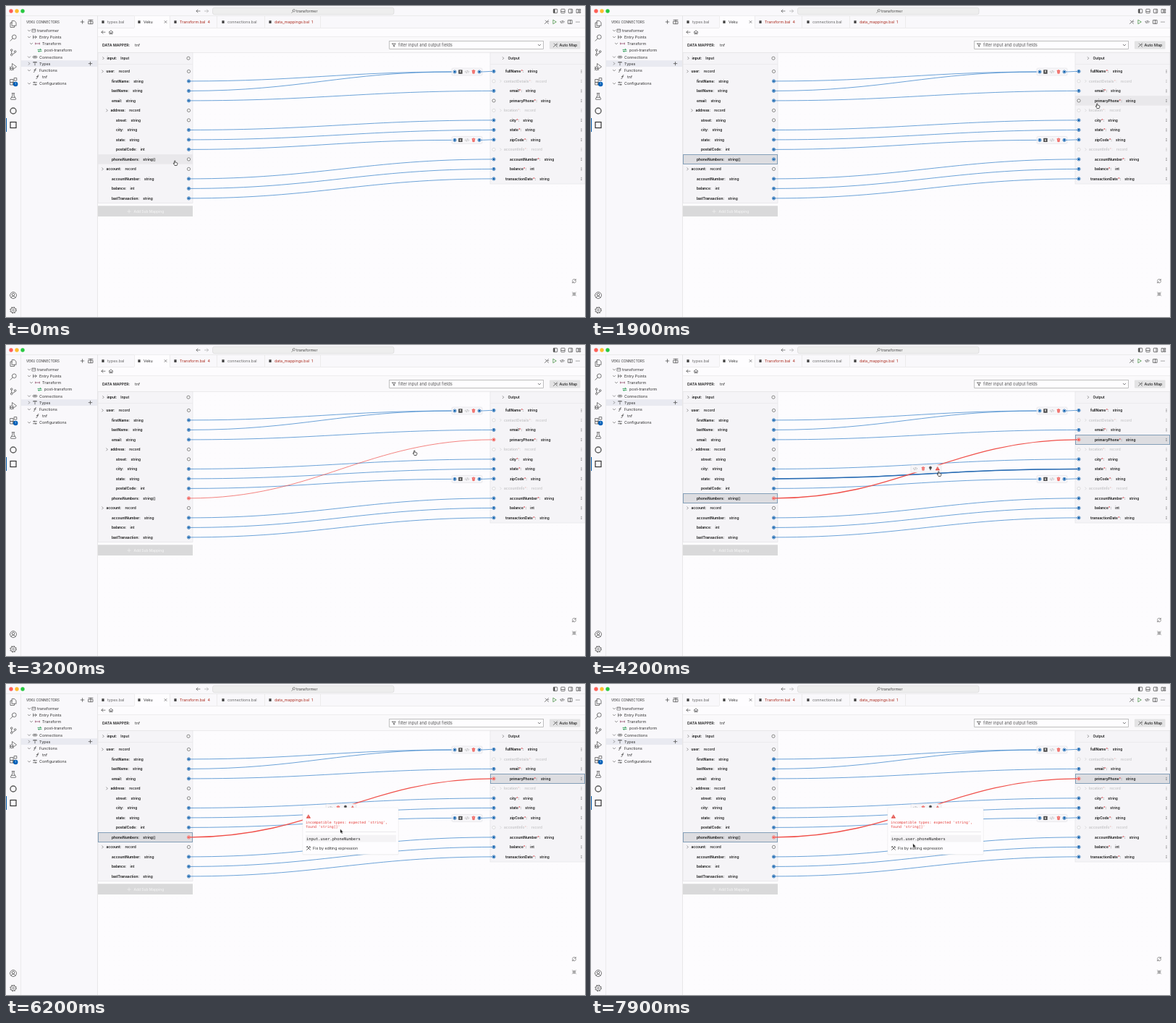
Write an HTML page that moves like this. It is 800 by 430 pixels and loops after 8000 ms.

```html
<!DOCTYPE html>
<html lang="en">
<head>
<meta charset="utf-8">
<title>Data mapper</title>
<style>
html, body { margin: 0; width: 100%; height: 100%; overflow: hidden; background: #fdfcfe }
svg { display: block; width: 100vw; height: 100vh; font-family: Inter, "Liberation Sans", sans-serif }
text { white-space: pre }
.mono { font-family: "DejaVu Sans Mono", monospace }
</style>
</head>
<body>
<svg id="stage" viewBox="0 0 800 430"></svg>
<script>
const LOOP = 8000, PICK = 300, JOIN = 2200, SELECT = 3600, POPUP = 4700;
const BLUE = '#0a5cab', RED = '#f0504a', INK = '#333', DIM = '#c9c9cb', SIDE = '#f9f8fb';
const out = [];
const add = s => out.push(s);
const rect = (x, y, w, h, fill, more = '') =>
  add(`<rect x="${x}" y="${y}" width="${w}" height="${h}" fill="${fill}" ${more}/>`);
const circle = (x, y, r, fill, more = '') =>
  add(`<circle cx="${x}" cy="${y}" r="${r}" fill="${fill}" ${more}/>`);
const text = (x, y, s, size = 5.4, fill = INK, more = '') =>
  add(`<text x="${x}" y="${y + size * .36}" font-size="${size}" fill="${fill}" ${more}>${s}</text>`);
const icon = (x, y, d, color = '#444', w = .7, fill = 'none') =>
  add(`<path transform="translate(${x} ${y})" d="${d}" fill="${fill}" stroke="${color}" stroke-width="${w}" stroke-linejoin="round" stroke-linecap="round"/>`);
// Wraps what is drawn so that it shows only between two times
const during = (from, to, draw) => {
  add(`<g data-from="${from}" data-to="${to}">`);
  draw();
  add('</g>');
};

const shape = {
  down: 'M-1.7-.8L0 .9L1.7-.8',
  right: 'M-.8-1.6L.8 0L-.8 1.6',
  left: 'M2.5 0H-2.5M-.6-2L-2.5 0L-.6 2',
  forward: 'M-2.5 0H2.5M.6-2L2.5 0L.6 2',
  cross: 'M-1.5-1.5L1.5 1.5M1.5-1.5L-1.5 1.5',
  plus: 'M-2.3 0H2.3M0-2.3V2.3',
  code: 'M-1.6-1.2L-2.8 0L-1.6 1.2M1.6-1.2L2.8 0L1.6 1.2M.5-1.7L-.5 1.7',
  trash: 'M-2-1.6H2M-.7-2.3H.7M-1.5-1.4L-1.2 2.2H1.2L1.5-1.4M-.4-.6V1.4M.4-.6V1.4',
  warn: 'M0-2.2L2.5 2H-2.5Z',
  wand: 'M-2.5 2.5L1 -1M-1.7-2L-.3-.6M2.4-2.4L1.5-1.5M.8 .8L2.4 2.4M1.6-.3H2.8',
  fn: 'M1.5-2.4Q.2-2.8 0-.8L-.4 1.5Q-.6 2.7-1.7 2.4M-1.2-.4H1.2',
  find: 'M-2.2 2.4L-.7 .8M-.9-.7a1.7 1.7 0 1 0 3.4 0a1.7 1.7 0 1 0-3.4 0'
};

function port(x, y, color) {
  circle(x, y, 2.1, '#fff', `stroke="${color || '#555'}" stroke-width=".7"`);
  if (color) circle(x, y, 1.3, color);
}

// Window frame, title bar and side bars
function shell() {
  rect(0, 0, 800, 430, '#fdfcfe');
  add('<defs><pattern id="grid" width="6.65" height="6.65" patternUnits="userSpaceOnUse"><circle cx="3" cy="3" r=".4" fill="#f1f0f5"/></pattern></defs>');
  rect(127, 64, 673, 366, 'url(#grid)');
  rect(0, 0, 800, 30, SIDE);
  rect(0, 13, 126, 417, SIDE);
  rect(0, 13.2, 800, .6, '#e3e3e3');
  rect(20, 13.5, .6, 417, '#e3e3e3');
  rect(126, 13.5, .7, 417, '#dedede');
  ['#ff5f57', '#febc2e', '#28c840'].forEach((c, i) => circle(7 + i * 8, 7, 2.7, c));
  icon(265.5, 7, shape.left, '#555');
  icon(277, 7, shape.forward, '#aaa');
  rect(285.5, 2.3, 250.5, 9.4, '#eeeeee', 'rx="2.5" stroke="#d6d6d6" stroke-width=".6"');
  icon(397, 7, shape.find, '#555', .6);
  text(401, 7, 'transformer', 5.3, '#444');
  [759, 769.5, 780].forEach((x, i) => {
    rect(x - 2.7, 4.3, 5.4, 5.4, 'none', 'rx=".7" stroke="#444" stroke-width=".7"');
    rect(...[[x - 2.5, 4.5, 2, 5], [x - 2.5, 7.3, 5, .7], [x + .6, 4.5, .7, 5]][i], '#444');
  });
  icon(791, 7, 'M-2.5-2.5H-.2V2.5H-2.5ZM1.2-2.5H2.8V-.6H1.2ZM1.2.8H2.8V2.5H1.2Z');

  const bar = [
    [25, 'M-1.5-4.5H1.7L4 -2.2V2.3H-1.5ZM-1.5-2H-4V4.5H1.5V2.3'],
    [44, 'M-4 4.2L-.8 .8M-1.6-1.2a2.9 2.9 0 1 0 5.8 0a2.9 2.9 0 1 0-5.8 0'],
    [64, 'M-3.6-3a1.3 1.3 0 1 0 2.6 0a1.3 1.3 0 1 0-2.6 0M-2.3-1.7V2.2M-3.6 3.5a1.3 1.3 0 1 0 2.6 0a1.3 1.3 0 1 0-2.6 0M1.4-1a1.3 1.3 0 1 0 2.6 0a1.3 1.3 0 1 0-2.6 0M2.7.3Q2.5 2-1 2.4'],
    [84, 'M-1.5-1V-4.5L4.5 0L.5 3M-4 1.7a1.8 1.8 0 0 1 3.6 0V3a1.8 1.8 0 0 1-3.6 0ZM-4.8.2L-4 1M.3.2L-.4 1M-4.9 2.4H.4M-4.8 4.6L-4 3.8M.3 4.6L-.4 3.8'],
    [104, 'M-4-2.5H0V1.5H-4ZM-4 1.5H0V5H-4ZM0 1.5H4V5H0ZM1.5-4.5H4.8V-1H1.5Z'],
    [125, 'M-1.8-4.2H1.8M-1.1-4.2V-1L-3.6 3.2Q-4 4.2-3 4.3H3Q4 4.2 3.6 3.2L1.1-1V-4.2M-2.4 1.3H2.4'],
    [400, 'M-4.5 0a4.5 4.5 0 1 0 9 0a4.5 4.5 0 1 0-9 0M-1.8-1a1.8 1.8 0 1 0 3.6 0a1.8 1.8 0 1 0-3.6 0M-2.9 3.2Q-2 1 0 1T2.9 3.2']
  ];
  bar.forEach(([y, d]) => icon(10, y, d, '#5a5a5a', .8));
  circle(10, 145, 4, 'none', 'stroke="#5a5a5a" stroke-width="1.4"');
  rect(6, 160.5, 8, 8, 'none', 'stroke="#333" stroke-width="1.2"');
  rect(0, 155, 1, 19, BLUE);
  circle(13.2, 108, 3.2, '#005fb8');
  text(13.2, 108, '1', 4, '#fff', 'text-anchor="middle"');
  circle(10, 420.5, 3.5, 'none', 'stroke="#5a5a5a" stroke-width=".8"');
  circle(10, 420.5, 1.3, 'none', 'stroke="#5a5a5a" stroke-width=".7"');
  circle(10, 420.5, 4.3, 'none', 'stroke="#5a5a5a" stroke-width="1" stroke-dasharray="1.7 1.677"');

  text(28, 22, 'VEKU CONNECTORS', 4.6);
  icon(105.5, 22, shape.plus);
  icon(117, 22, 'M-3-2.7H3M-3-.8H3V2.7H-3ZM0-2.7V2.7');
  rect(20.6, 75.2, 105.4, 8.8, '#e9eaf1');
  const tree = [
    [34, 32, 43, 'transformer'], [43, 32, 46, 'Entry Points'], [52, 35, 50, 'Transform'],
    [61.4, 0, 53, 'post-transform'], [70.6, 32, 46, 'Connections'], [79.6, 32, 46, 'Types'],
    [89, 32, 46, 'Functions'], [98, 0, 50, 'tnf'], [107.2, 32, 46, 'Configurations']
  ];
  tree.forEach(([y, fold, x, s], i) => {
    if (fold) icon(fold, y, i == 5 ? shape.right : shape.down, '#555', .6);
    text(x, y, s);
  });
  icon(38.5, 34, 'M-2.2-2H2.2V2H-2.2ZM-2.2-.8H2.2', '#555', .6);
  icon(40, 43, 'M-2.2 0H2.2M.4-1.8L2.2 0L.4 1.8M-2.3-2V2');
  icon(43.5, 52, 'M-2.8 0H2.8M-2.8-1V1M2.8-1V1', '#8a4060');
  icon(46.5, 61.4, 'M-2.5-1H2M.8-2.2L2-1M2.5 1H-2M-.8 2.2L-2 1', '#2e9d57', .9);
  icon(40, 70.6, 'M-.4-1.3H-1.5a1.3 1.3 0 0 0 0 2.6H-.4M.4-1.3H1.5a1.3 1.3 0 0 1 0 2.6H.4M-1 0H1');
  icon(40, 79.6, 'M-2-2H2M0-2V2.3M-2-2V-1.2M2-2V-1.2');
  icon(40, 89, shape.fn);
  icon(43.5, 98, shape.fn);
  icon(40, 107.2, 'M-2.4-1.5H2.4M-2.4 1.5H2.4M-1-2.3V-.7M1 .7V2.3');
  icon(116.5, 79.6, shape.plus);
}

function header() {
  rect(177, 13.8, 49, 17, '#fefdff');
  rect(127, 30, 50, .6, '#e3e3e3');
  rect(226, 30, 574, .6, '#e3e3e3');
  [177, 226, 291, 357, 434].forEach(x => rect(x, 14, .6, 16, '#e3e3e3'));
  const tabs = [
    [140, 'types.bal', '#666'], [190, 'Veku', INK], [240, 'Transform.bal  4', '#ad2d20'],
    [306, 'connections.bal', '#666'], [371, 'data_mappings.bal  1', '#ad2d20']
  ];
  tabs.forEach(([x, s, c]) => {
    rect(x - 7.6, 20.2, 3.2, 3.8, '#444');
    text(x, 22, s, 5.4, c);
  });
  icon(220.5, 22, shape.cross, '#444', .6);
  icon(747, 22, shape.wand);
  icon(758, 22, 'M-1.8-2.6L2.3 0L-1.8 2.6Z', '#388a34');
  icon(768.5, 22, shape.code, '#444', .8);
  icon(779.5, 22, 'M-2.6-2.4H2.6V2.4H-2.6ZM0-2.4V2.4');
  [788, 790, 792].forEach(x => circle(x, 22, .6, '#444'));
  icon(134.5, 36.2, shape.left);
  icon(145, 36.2, 'M-2.8 .1L0-2.5L2.8 .1M-2-.5V2.5H-.6V.7H.6V2.5H2V-.5');
  rect(127, 42, 673, 22.2, '#faf9fb');
  rect(127, 42, 673, .6, '#e6e6e6');
  rect(127, 64, 673, .6, '#e1e1e1');
  text(133, 54, 'DATA MAPPER:', 5.2, '#222', 'font-weight="600"');
  text(178, 54, 'tnf', 5.4);
  rect(529.7, 48.5, 212.8, 11, '#fefdff', 'stroke="#a5a5a5" stroke-width=".7"');
  icon(536, 54, 'M-2.3-2H2.3L.7 0V2.2L-.7 1.5V0Z');
  text(542, 54, 'filter input and output fields', 5.75, '#555');
  icon(737, 54, shape.down);
  rect(751, 48.5, 42.5, 11, '#e3e3e4', 'rx="1"');
  icon(759, 54, shape.wand);
  text(764.5, 54, 'Auto Map', 5.4, '#222', 'font-weight="500"');
}

const rowY = i => 90.4 + i * 13.5;
// Each field: text x, name, type, linked
const inputs = [
  [138.5, 'user', 'record'], [146, 'firstName', 'string', 1], [146, 'lastName', 'string', 1],
  [146, 'email', 'string', 1], [144.5, 'address', 'record'], [152, 'street', 'string'],
  [152, 'city', 'string', 1], [152, 'state', 'string', 1], [152, 'postalCode', 'int', 1],
  [146, 'phoneNumbers', 'string[]'], [138.5, 'account', 'record'],
  [146, 'accountNumber', 'string', 1], [146, 'balance', 'int', 1], [146, 'lastTransaction', 'string', 1]
];
const outputs = [
  [690, 'fullName', 'string', 1], [688, 'contactDetails', 'record'], [696, 'email', 'string', 1],
  [696, 'primaryPhone', 'string'], [688, 'location', 'record'], [696, 'city', 'string', 1],
  [696, 'state', 'string', 1], [696, 'zipCode', 'string', 1], [688, 'accountInfo', 'record'],
  [696, 'accountNumber', 'string', 1], [696, 'balance', 'int', 1], [690, 'transactionDate', 'string', 1]
];

function field(x, y, name, type, color, star = '') {
  text(x, y, `<tspan font-weight="700">${name}${star}:</tspan><tspan dx="5" font-weight="600">${type}</tspan>`, 4.85, color);
}

const hover = (x, y) => rect(x, y - 6.7, 131, 13.4, '#e9e8eb');
const chosen = (x, y) => rect(x + .4, y - 6.3, 130.2, 12.8, '#dddde1', 'stroke="#6b8cab" stroke-width=".8"');

function panels() {
  rect(127, 64.6, 131, 208, '#f5f4f7', 'stroke="#e2e2e4" stroke-width=".6"');
  rect(127, 80, 131, .7, '#e9e9eb');
  rect(669, 64.6, 131, 181.4, '#f5f4f7', 'stroke="#e2e2e4" stroke-width=".6"');
  rect(669, 80, 131, .7, '#e9e9eb');
  const phone = rowY(9), primary = rowY(3);
  during(0, PICK, () => hover(127, phone));
  during(PICK, JOIN, () => chosen(127, phone));
  during(1200, 2600, () => hover(669, primary));
  during(SELECT, LOOP, () => { chosen(127, phone); chosen(669, primary); });

  icon(134.5, 72.2, shape.right, '#555', .6);
  field(139.5, 72.2, 'input', 'Input', '#222');
  port(252, 72.2);
  icon(687, 72.2, shape.right, '#555', .6);
  text(693.5, 72.2, 'Output', 4.9, '#222', 'font-weight="600"');
  inputs.forEach(([x, name, type], i) => {
    if (type == 'record') icon(x - 5, rowY(i), shape.right, '#555', .6);
    field(x, rowY(i), name, type, '#222');
  });
  outputs.forEach(([x, name, type], i) => {
    const y = rowY(i), dim = type == 'record';
    if (dim) icon(x - 4.5, y, shape.right, DIM, .6);
    field(x, y, name, type, dim ? DIM : '#222', `<tspan fill="${dim ? '#ecc5c3' : '#d9363e'}">*</tspan>`);
    [-1.7, 0, 1.7].forEach(d => circle(795, y + d, .5, dim ? '#999' : '#444'));
  });
  rect(127, 276.3, 131, 14.7, '#d9d9da');
  icon(170, 284, shape.plus, '#f3f3f3', .6);
  text(176.5, 284, 'Add Sub Mapping', 4.9, '#f3f3f3', 'font-weight="500"');
}

function link(x1, y1, x2, y2, color = '#3b84cb', w = .75) {
  const c = (x2 - x1) * .42;
  add(`<path d="M${x1} ${y1}C${x1 + c} ${y1} ${x2 - c} ${y2} ${x2} ${y2}" fill="none" stroke="${color}" stroke-width="${w}"/>`);
}

const toolbox = (x, y) => rect(x, y - 5, 42, 10, '#f7f6f9', 'rx="1.5" stroke="#e0e0e2" stroke-width=".6"');

function links() {
  const pairs = [[3, 2], [6, 5], [7, 6], [11, 9], [12, 10], [13, 11]];
  pairs.forEach(([a, b]) => link(252.5, rowY(a), 674, rowY(b)));
  const strong = (a, b) => link(252.5, rowY(a), 674, rowY(b), '#2a6cb3', 1.5);
  during(900, 1120, () => strong(6, 5));
  during(4000, 4650, () => strong(7, 6));
  [[1, 91], [2, 91], [8, 185.4]].forEach(([a, y]) => link(252.5, rowY(a), 620, y));
  [[91, 0], [185.4, 7]].forEach(([y, b]) => {
    toolbox(616, y);
    link(654, y, 674, rowY(b));
    port(620, y, BLUE);
    rect(625.2, y - 2.7, 5.4, 5.4, '#4b4b4b', 'rx=".5"');
    text(628, y, 'E', 4, '#fff', 'text-anchor="middle" font-weight="600"');
    icon(637, y, shape.code, '#888', .5);
    icon(646, y, shape.trash, RED, .8);
    port(654, y, BLUE);
  });
  const wrong = w => link(252.5, rowY(9), 674, rowY(3), RED, w);
  during(JOIN, SELECT, () => wrong(.7));
  during(SELECT, LOOP, () => wrong(1.3));
}

function ports() {
  inputs.forEach((f, i) => i != 9 && port(252.5, rowY(i), f[3] && BLUE));
  outputs.forEach(([, , type, linked], i) => {
    if (type == 'record') circle(674, rowY(i), 2.1, '#fbfbfb', `stroke="${DIM}" stroke-width=".6"`);
    else if (i != 3) port(674, rowY(i), linked && BLUE);
  });
  during(0, PICK, () => port(252.5, rowY(9)));
  during(PICK, JOIN, () => port(252.5, rowY(9), BLUE));
  during(0, JOIN, () => port(674, rowY(3)));
  during(JOIN, LOOP, () => { port(252.5, rowY(9), RED); port(674, rowY(3), RED); });
}

function warning(x, y) {
  icon(x, y, shape.warn, '#e03c34', .6, '#e03c34');
  icon(x, y, 'M0-.8V.5M0 1.3V1.35', '#fff', .5);
}

function overlays() {
  during(SELECT, LOOP, () => {
    toolbox(442, 171);
    icon(448, 171, shape.code, '#888', .5);
    icon(459, 171, shape.trash, RED, .7);
    icon(469, 170.2, 'M-.7 1.2Q-1.7 .2-1.6-.6A1.6 1.6 0 0 1 1.6-.6Q1.7 .2 .7 1.2ZM-.5 2.4H.5', '#444', .7, '#444');
    warning(479, 171);
  });
  during(POPUP, LOOP, () => {
    rect(409.5, 171.5, 133, 65, '#0000000d', 'rx="1.5"');
    rect(410, 171, 132, 64.5, '#fefdff', 'rx="1" stroke="#ececec" stroke-width=".5"');
    warning(418, 183.3);
    text(414, 190.8, "incompatible types: expected 'string',", 4.95, '#e5403c', 'class="mono"');
    text(414, 197, "found 'string[]'", 4.95, '#e5403c', 'class="mono"');
    rect(414, 204.3, 125, .6, '#dcdcdc');
    rect(414, 208.7, 125, 9.8, '#f4f3f5');
    text(415, 213.6, 'input.user.phoneNumbers', 5.4, '#222', 'class="mono"');
    icon(418, 227, 'M-2.4 2.5L2-1.9M-2.2-2.3L2.4 2.3M-2.7-1.2L-1.2-2.7M.8-2.3Q2.5-2.8 2.6-.8', '#444', .8);
    text(424, 227, 'Fix by editing expression', 5.3, INK);
  });
  icon(785, 380.3, 'M-2.5-.4A2.5 2.5 0 0 1 2.1-1.4M2.3-2.7V-1.1H.7M2.5 .4A2.5 2.5 0 0 1-2.1 1.4M-2.3 2.7V1.1H-.7', '#555', .6);
  icon(785, 398.3, 'M-2.6-2.6L-.6-.6M-.6-2V-.6H-2M2.6-2.6L.6-.6M.6-2V-.6H2M-2.6 2.6L-.6 .6M-.6 2V.6H-2M2.6 2.6L.6 .6M.6 2V.6H2', '#555', .5);
}

function pointers() {
  add('<g id="pointer"><g id="hand">');
  icon(0, 0, 'M-1.3 .4V-2.5Q-1.3-3.2-.7-3.2T-.1-2.5V-.7Q.8-1.1 1-.4Q1.8-.7 2-.1Q2.9-.3 2.9 .7Q2.9 2.5 2.1 3.5H-.9Q-1.5 2.3-2.6 1Q-2.9 .2-2.2 0Q-1.8-.1-1.3 .4Z', '#222', .75, '#fff');
  add('</g><g id="move">');
  icon(0, 0, 'M-2.6 0H2.6M0-2.6V2.6', '#fff', 2);
  icon(0, 0, 'M-2.4 0H2.4M0-2.4V2.4', '#111', 1);
  icon(0, 0, 'M0-3L.8-2.1H-.8ZM0 3L.8 2.1H-.8ZM-3 0L-2.1-.8V.8ZM3 0L2.1-.8V.8Z', '#111', .3, '#111');
  add('</g><g id="arrow">');
  icon(0, 0, 'M-1.6-3.2V2L-.4 .9L.5 3L1.4 2.6L.5 .6H2.1Z', '#fff', .9, '#fff');
  icon(0, 0, 'M-1.4-2.8V1.6L-.3 .6L.6 2.7L1.1 2.5L.2 .4H1.7Z', '#111', .3, '#111');
  add('</g></g>');
}

[shell, header, panels, links, ports, overlays, pointers].forEach(draw => draw());
const byId = id => document.getElementById(id);
byId('stage').innerHTML = out.join('');

// Pointer path: time, x, y
const path = [
  [0, 234, 217], [400, 234, 217], [1000, 665, 151], [1300, 700, 138], [2500, 700, 138],
  [3200, 565, 149], [3600, 466, 172], [4000, 481, 178], [4250, 481, 178], [4600, 479, 173],
  [5000, 479, 173], [5700, 463.5, 204], [6500, 463.5, 204], [7400, 446.5, 224], [8000, 446.5, 224]
];
const timed = [...document.querySelectorAll('[data-from]')];

function place(t) {
  const i = path.findIndex(p => p[0] > t);
  const [a, b] = [path[i - 1], path[i]];
  const u = (t - a[0]) / (b[0] - a[0]), e = u * u * (3 - 2 * u);
  return [a[1] + (b[1] - a[1]) * e, a[2] + (b[2] - a[2]) * e];
}

function frame(now) {
  const t = now % LOOP, [x, y] = place(t);
  for (const g of timed) g.style.display = t >= +g.dataset.from && t < +g.dataset.to ? '' : 'none';
  byId('pointer').setAttribute('transform', `translate(${x} ${y})`);
  const open = x > 258 && x < 669 && t < 3150;
  const kind = t >= POPUP ? 'arrow' : open ? 'move' : 'hand';
  for (const id of ['hand', 'move', 'arrow']) byId(id).style.display = id == kind ? '' : 'none';
}

const start = performance.now();
function tick() {
  frame(performance.now() - start);
  requestAnimationFrame(tick);
}
tick();
</script>
</body>
</html>
```
